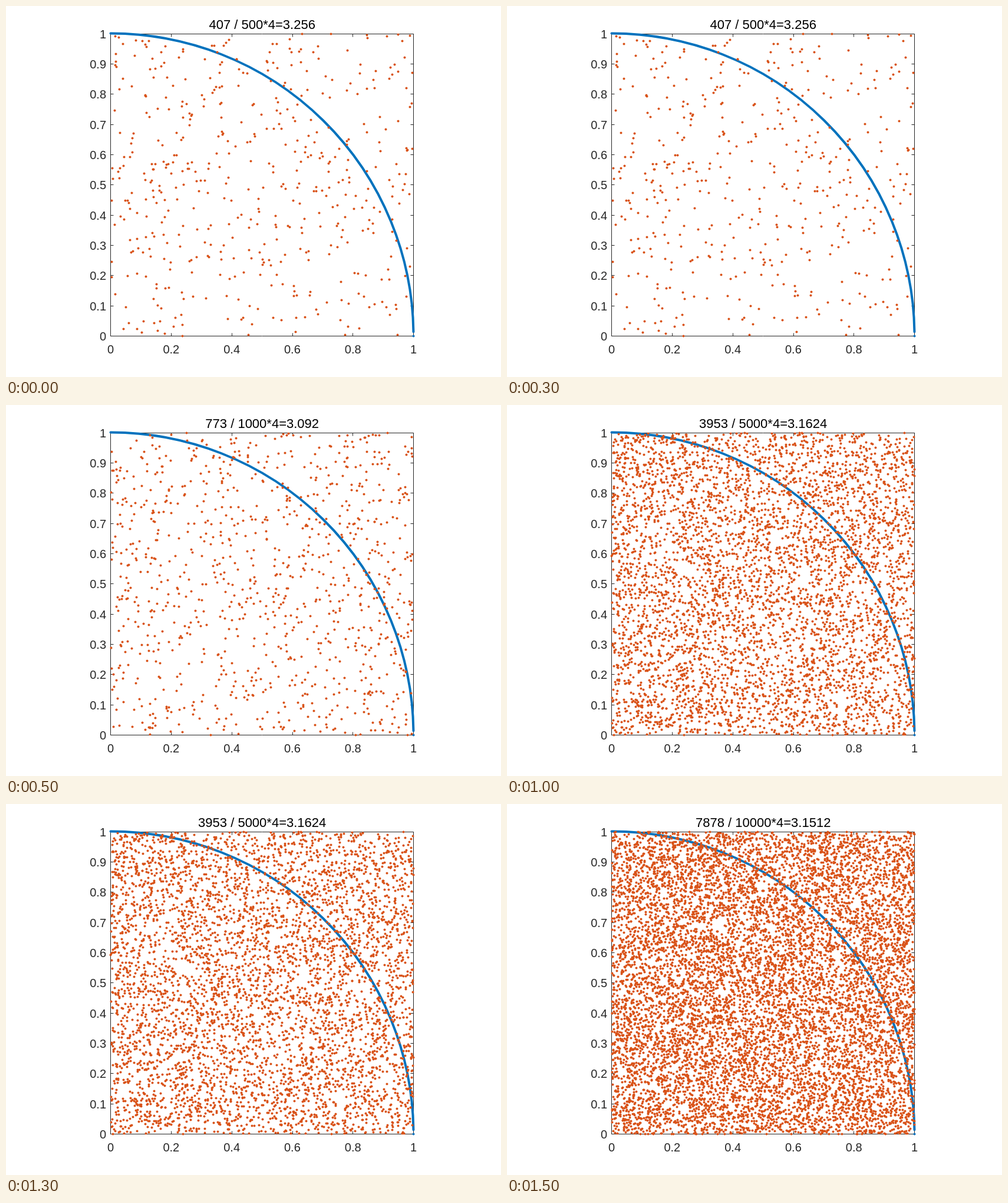
These frames come from a looping animation (840x630 px, 2000 ms). An HTML page with a canvas:

```html
<!DOCTYPE html>
<html lang="en">
<head>
<meta charset="utf-8">
<title>Monte Carlo estimate of pi</title>
<style>
  html, body { margin: 0; width: 100%; height: 100%; overflow: hidden; background: #fff; }
  canvas { display: block; }
</style>
</head>
<body>
<canvas id="stage" width="840" height="630"></canvas>
<script>
const W = 840, H = 630, HOLD = 500;
const LEFT = 177.98, TOP = 47.25, SIZE = 513.4;
const FONT = 'Arial, "Liberation Sans", sans-serif';
const RUNS = [
  { inside: 407, total: 500 },
  { inside: 773, total: 1000 },
  { inside: 3953, total: 5000 },
  { inside: 7878, total: 10000 },
];

// Data coordinates to the centre of a pixel
const px = x => Math.floor(LEFT + x * SIZE) + 0.5;
const py = y => Math.floor(TOP + (1 - y) * SIZE) + 0.5;

function seededRandom(seed) {
  return () => {
    seed = (seed + 0x6D2B79F5) | 0;
    let t = Math.imul(seed ^ (seed >>> 15), seed | 1);
    t ^= t + Math.imul(t ^ (t >>> 7), t | 61);
    return ((t ^ (t >>> 14)) >>> 0) / 4294967296;
  };
}

function dot(c, x, y) {
  c.beginPath();
  c.arc(px(x), py(y), 2, 0, 2 * Math.PI);
  c.fill();
}

function drawAxes(c) {
  const x0 = px(0), x1 = px(1), y0 = py(0), y1 = py(1), tick = 5;
  const line = (ax, ay, bx, by) => { c.moveTo(ax, ay); c.lineTo(bx, by); };
  c.strokeStyle = c.fillStyle = '#262626';
  c.font = '20px ' + FONT;
  c.beginPath();
  c.rect(x0, y1, x1 - x0, y0 - y1);
  for (let i = 0; i <= 10; i++) {
    const v = i / 10, x = px(v), y = py(v);
    line(x0, y, x0 + tick, y);
    line(x1, y, x1 - tick, y);
    c.textAlign = 'right';
    c.fillText(v, 170, y + 7.5);
    if (i % 2) continue;
    line(x, y0, x, y0 - tick);
    line(x, y1, x, y1 + tick);
    c.textAlign = 'center';
    c.fillText(v, x0 + v * (x1 - x0), 590);
  }
  c.stroke();
}

// Samples every 1e-4 in x merge into a line, except for the last one at (1, 0)
function drawCurve(c) {
  const lastAngle = Math.acos(1 - 1e-4);
  c.strokeStyle = c.fillStyle = '#0072BD';
  c.lineWidth = 4;
  c.lineCap = 'round';
  c.beginPath();
  c.arc(px(0), py(0), px(1) - px(0), -lastAngle, -Math.PI / 2, true);
  c.stroke();
  dot(c, 1, 0);
}

// Scatter exactly the stated number of points on each side of the arc
function drawSamples(c, { inside, total }) {
  const random = seededRandom(total);
  const left = { hit: inside, miss: total - inside };
  c.fillStyle = '#D95319';
  while (left.hit || left.miss) {
    const x = random(), y = random();
    const side = x * x + y * y <= 1 ? 'hit' : 'miss';
    if (!left[side]) continue;
    left[side]--;
    dot(c, x, y);
  }
}

function render(run) {
  const canvas = document.createElement('canvas');
  canvas.width = W;
  canvas.height = H;
  const c = canvas.getContext('2d');
  c.fillStyle = '#fff';
  c.fillRect(0, 0, W, H);
  drawAxes(c);
  drawCurve(c);
  drawSamples(c, run);
  c.fillStyle = '#000';
  c.font = '22px ' + FONT;
  c.textAlign = 'center';
  c.fillText(`${run.inside} / ${run.total}*4=${run.inside / run.total * 4}`, 434.7, 39);
  return canvas;
}

const pictures = RUNS.map(render);
const stage = document.getElementById('stage').getContext('2d');
let start;

function play(now) {
  start ??= now;
  stage.drawImage(pictures[Math.floor((now - start) / HOLD) % pictures.length], 0, 0);
  requestAnimationFrame(play);
}
requestAnimationFrame(play);
</script>
</body>
</html>
```
